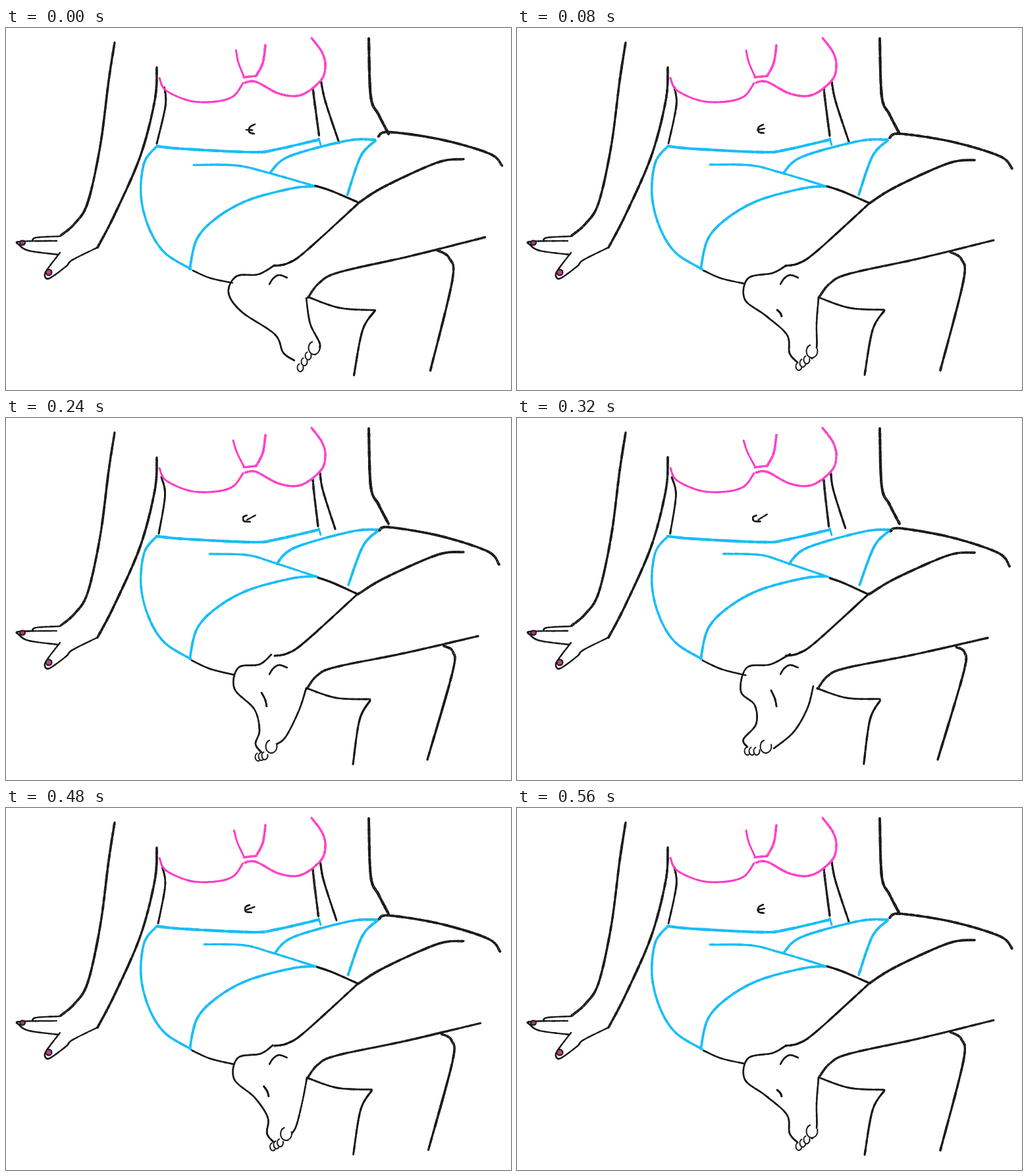
Animation of 767x551 px, one loop 0.64 s. Source, as an HTML page with a canvas:

```html
<!DOCTYPE html>
<html lang="en">
<head>
<meta charset="utf-8">
<title>Swinging foot</title>
<style>
  html, body { margin: 0; width: 100%; height: 100%; overflow: hidden; background: #fff; }
  canvas { display: block; }
</style>
</head>
<body>
<canvas id="stage" width="767" height="551"></canvas>
<script>
const ctx = document.getElementById('stage').getContext('2d');
const INK = '#191919', PINK = '#ff3cc6', BLUE = '#16bcf6';
const FRAME_MS = 80;
const SWING = [0, 1, 2, 3, 4, 3, 2, 1];
const DRIFT = [-0.5, 0, 0.5, 1, 1.3];

let pose = 0, random;

function seeded(seed) {
  return () => (seed = (seed * 16807) % 2147483647) / 2147483647;
}

const numbers = text => text.split(' ').map(Number);

// Four key poses; the middle pose is the blend of its neighbours.
function posed(...keys) {
  const [a, b, d, e] = keys.map(numbers);
  return [a, b, b.map((v, i) => (v + d[i]) / 2), d, e][pose];
}

function spline(p0, p1, p2, p3, t) {
  return p1 + t / 2 * (p2 - p0 + t * (2 * p0 - 5 * p1 + 4 * p2 - p3 + t * (3 * (p1 - p2) + p3 - p0)));
}

// Smooth crayon line: slightly uneven, with pale grain where it is thick.
function crayon(color, width, xy) {
  const last = xy.length / 2 - 1;
  const coord = (i, axis) => xy[2 * Math.max(0, Math.min(last, i)) + axis];
  const at = s => {
    const i = Math.min(Math.floor(s), last - 1);
    return [0, 1].map(axis => spline(coord(i - 1, axis), coord(i, axis),
      coord(i + 1, axis), coord(i + 2, axis), s - i));
  };
  const steps = last * 16;
  const grain = [];
  let from = at(0);
  ctx.strokeStyle = color;
  for (let k = 1; k <= steps; k++) {
    const to = at(last * k / steps);
    ctx.lineWidth = width * (0.88 + 0.24 * random());
    ctx.beginPath();
    ctx.moveTo(...from);
    ctx.lineTo(...to);
    ctx.stroke();
    if (width > 3) grain.push(to.map(v => v + (random() - 0.5) * width));
    from = to;
  }
  ctx.fillStyle = 'rgba(255,255,255,.3)';
  for (const [x, y] of grain) ctx.fillRect(x - 0.5, y - 0.5, 1, 1);
}

// Line whose two ends shift as the leg swings.
function line(color, width, points, shift = '0 0 0 0') {
  const xy = numbers(points), ends = numbers(shift);
  crayon(color, width, xy.map((v, i) => {
    const along = Math.floor(i / 2) / (xy.length / 2 - 1), axis = i % 2;
    return v + DRIFT[pose] * (ends[axis] * (1 - along) + ends[axis + 2] * along);
  }));
}

function oval(x, y, rx, ry, fill, start = 0, end = 2 * Math.PI) {
  ctx.beginPath();
  ctx.ellipse(x, y, rx, ry, 0, start, end);
  ctx.fillStyle = fill;
  ctx.fill();
  ctx.strokeStyle = INK;
  ctx.lineWidth = 2;
  ctx.stroke();
}

function drawArms() {
  line(INK, 3.5, '165 22 156 80 143 180 124 266 104 298 83 316');
  line(INK, 3.5, '229 60 226 110 204 195 165 284 139 334');
  line(INK, 2.2, '139 334 101 353 91 363 66 381 59 377 63 367 82 342');
  line(INK, 2.3, '80 345 35 339 20 330 21 325 77 324');
  line(INK, 2.2, '40 324 46 319 82 317');
  line(INK, 3, '478 82 484 112 504 173', '-1 2 -4 -4');
  line(INK, 4, '551 16 554 104 566 132 581 161');
  oval(25, 327, 4, 3.5, '#b0357f');
  oval(65, 372, 4.5, 4.5, '#c8388f');
}

function drawTorso() {
  line(INK, 2.8, '239 90 242 118 230 176', '-3 0 2 0');
  line(INK, 3.2, '466 92 469 118 475 164', '0 2 -1 1');
  line(INK, 2.2, '374 147 367 151 367 158 375 160', '-8 1 -4 -2');
  line(INK, 2, '365 155 376 153', '1 0 3 -5');
}

function drawTop() {
  line(PINK, 2.8, '233 76 243 95 280 111 318 112 345 104 360 84');
  line(PINK, 3.2, '363 83 380 82 415 100 448 102 478 80 485 58 480 37 464 15');
  line(PINK, 2.6, '348 34 352 52 361 73', '-3 0 0 0');
  line(PINK, 3.2, '361 75 380 73');
  line(PINK, 3.4, '380 73 390 53 394 26');
}

function drawShorts() {
  line(BLUE, 4, '229 180 270 184 375 189 410 185 475 170');
  line(BLUE, 2.5, '475 168 478 178');
  line(BLUE, 3.4, '229 180 210 205 205 255 217 304 241 342 281 367');
  line(BLUE, 3.6, '470 241 435 244 368 262 320 289 290 321 279 367');
  line(BLUE, 3.2, '293 208 355 209 400 220 470 241', '16 -1 3 1');
  line(BLUE, 3.6, '405 220 433 196 520 172 563 170', '6 2 5 0');
  line(BLUE, 3.7, '563 171 540 195 519 254', '4 -1 1 0');
}

function drawLegs() {
  line(INK, 3.6, '566 167 582 161 660 173 733 195 752 214', '1 4 -3 9');
  line(INK, 3.5, '695 201 655 206 575 242 535 267', '0 3 0 1');
  line(INK, 3, '535 267 455 340 428 358 408 362');
  line(INK, 3.2, '724 323 610 351 505 374 475 389 458 411', '-7 9 -1 1');
  line(INK, 3, '471 241 495 249 534 266', '3 2 0 2');
  line(INK, 2.4, '283 369 310 381 345 389', '-1 0 2 2');
  line(INK, 2.7, '458 410 505 426 558 429', '-2 1 -5 -1');
  line(INK, 3, '558 430 540 460 528 528', '-5 0 -1 -1');
  line(INK, 3.5, '658 341 675 352 678 385 643 521', '7 6 -3 -1');
}

function drawFoot() {
  crayon(INK, 2.5, posed(
    '408 361 383 375 350 378 338 403 358 432 408 466 421 494 438 506',
    '408 362 388 373 351 381 346 413 378 438 410 467 414 495 426 509',
    '403 360 385 375 353 380 347 412 377 443 385 475 379 496 388 509',
    '415 359 385 375 349 380 340 416 361 437 363 466 344 489 350 501'));
  crayon(INK, 2.5, posed(
    '456 411 462 450 477 482 470 497',
    '458 411 455 450 455 487 448 503',
    '456 411 445 445 425 485 410 497',
    '450 408 441 442 420 478 390 503'));
  line(INK, 2.3, '400 390 406 381 415 376 427 380');
  if (pose > 0) line(INK, 2.6, '395 429 400 434 402 439', '-7 -11 -6 0');

  // Smallest toe, step to the next toe, big toe.
  const [x, y, dx, dy, bigX, bigY] = posed(
    '447 517 6 -9 468 487',
    '428 515 6 -5 448 492',
    '383 516 5 -1 403 500',
    '350 507 7 0 378 500');
  const gapStart = -1.9, gapEnd = -0.3;
  const toe = (cx, cy, rx, ry) => oval(cx, cy, rx, ry, '#fff', gapEnd, gapStart + 2 * Math.PI);
  for (let i = 0; i < 3; i++) toe(x + i * dx, y + i * dy, 4.5, 6);
  toe(bigX, bigY, 8.5, 10);
}

function draw() {
  random = seeded(77 * pose + 5);
  ctx.fillStyle = '#fff';
  ctx.fillRect(0, 0, 767, 551);
  ctx.lineCap = 'round';
  drawArms();
  drawTorso();
  drawTop();
  drawShorts();
  drawLegs();
  drawFoot();
}

const start = performance.now();
let shown = -1;
function tick() {
  const step = Math.floor((performance.now() - start) / FRAME_MS) % SWING.length;
  if (step !== shown) {
    shown = step;
    pose = SWING[step];
    draw();
  }
  requestAnimationFrame(tick);
}
tick();
</script>
</body>
</html>
```
